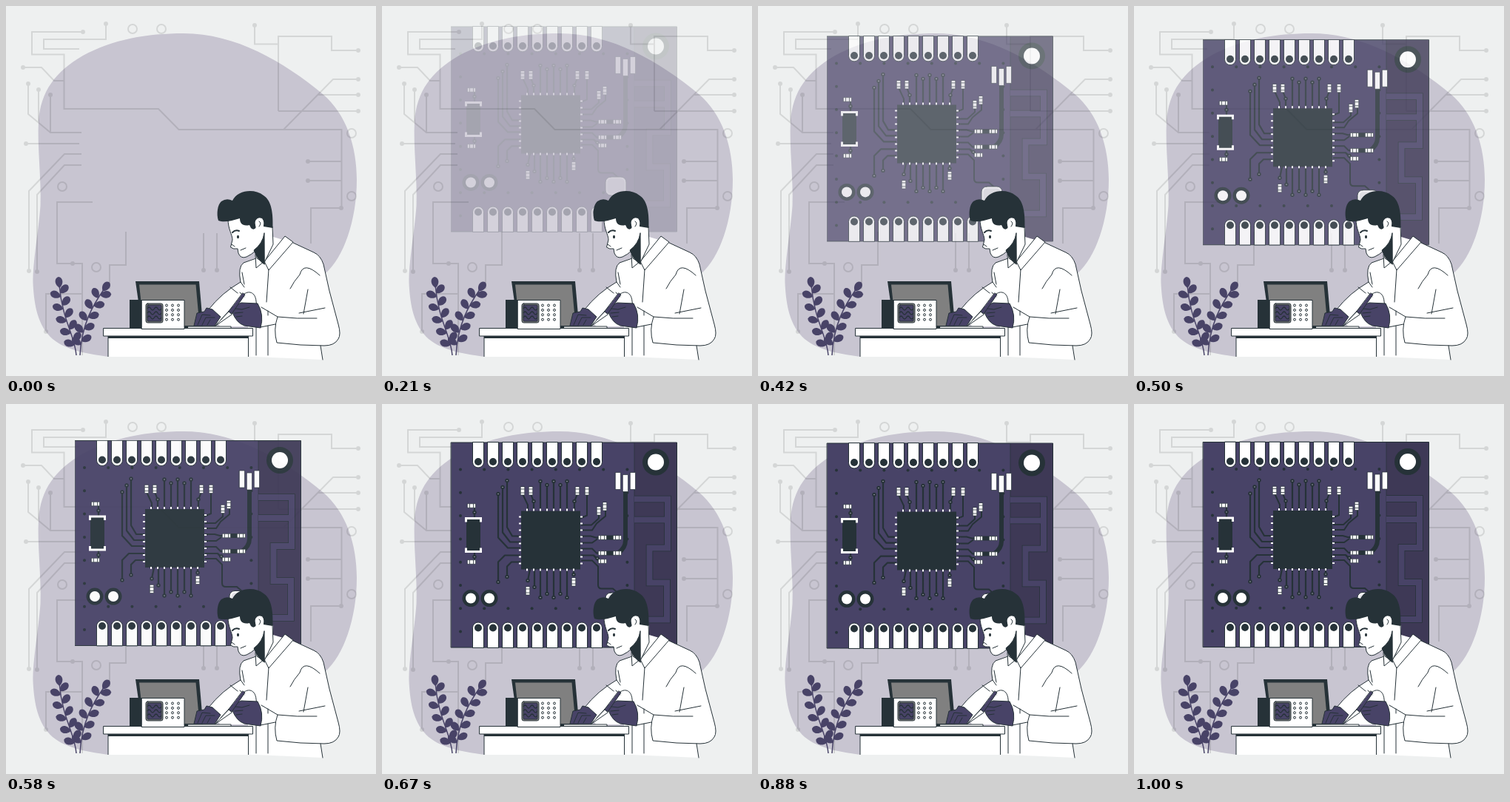
An HTML page for the animation above (1040 ms loop, 500 px wide and 500 px high).

```html
<!DOCTYPE html>
<html lang="en">
<head>
<meta charset="utf-8">
<title>Electronics workshop</title>
<style>
html, body { margin: 0; width: 100%; height: 100%; overflow: hidden; background: #eef0f0 }
svg { display: block; width: 100vw; height: 100vh }
.dark { fill: #263238 }
.plum { fill: #484367 }
.white { fill: #fff }
.line { fill: none; stroke: #263238 }
.ink { stroke: #263238; stroke-linejoin: round; stroke-linecap: round }
.bare { stroke: none }
</style>
</head>
<body>
<svg viewBox="0 0 500 500">
  <path fill="#c8c5d1" d="M240 37C310 37 375 75 428 119C460 146 474 190 474 235C474 290 456 340 432 361L340 474H140C115 471 82 466 63 450C43 432 38 405 36.500 375C36 345 44 305 46.500 270C48 235 42 190 44 155C47 116 66 89 104 67C145 45 190 37 240 37Z"/>

  <!-- every wire in the first path starts at a round node -->
  <g opacity=".1">
    <g fill="none" stroke="#000" stroke-width="2">
      <path id="wires" d="M104 35H35V65.500H78.500V139H206L233.500 167H453.500V273M453 273H412V321M135 24V45H51V58H99M23 83H48L65 101H78M30 105V146L60 171H102M44 113V157M60 120V171M27 186H99M31 358V250L79 200H102M42 359V255L79 215H102M90 348H69V265H117M54 440V389H103M267 357V307M285 357V307M336 26V51.500H368M476 60H440V41H368V142M476 99H442L375 167M476 120H421M476 142H368M408 210H453M408 236H453"/>
      <path d="M90 348H103V472M162 305V350H140V382"/>
      <g id="rings"></g>
    </g>
    <g id="nodes"></g>
  </g>

  <g id="board">
    <path class="plum ink" d="M93.500 51.500H398.500V328.500H93.500Z"/>
    <path fill="#3e3956" d="M341 52H398V328H341Z"/>
    <path class="line" stroke-width=".7" d="M341 52V328"/>
    <g id="antenna" fill="none"></g>
    <g id="grid" class="dark"></g>
    <g id="pads"></g>
    <path id="traces" class="line" stroke-width="2.200" stroke-linejoin="round"/>
    <path class="line" stroke-width="2" d="M190 121L197 136V143M201 121L205 131M264 121L260 131M277 122V150L268 154M293 149V154L283 163H269M302 143V151L290 161L284 170H269M269 178H282L289 180H297M269 187H284L291 182M269 195H284L290 201H297M269 204H286L293 212M269 211H284L292 219V244Q292 249 297 249H312L319 255M125 139V154M125 198V211"/>
    <path class="line" stroke-width="6" d="M329 118V184Q329 194 319 201M297 180H323M297 201H323"/>
    <path class="dark" d="M188 144H268V223H188ZM114 154H133V198H114Z"/>
    <path fill="none" stroke="#fff" stroke-width="3" d="M113.500 159V154H133.500V159M113.500 194V199H133.500V194"/>
    <g id="vias"></g>
    <g id="pins" class="white"></g>
    <g id="parts"></g>
    <rect class="ink" fill="#fff" x="302" y="254.500" width="28" height="25" rx="7"/>
    <rect fill="#e4e4e8" x="304.500" y="257" width="23" height="20" rx="5"/>
    <path class="white ink" stroke-width=".7" d="M315.500 92H322.500V115H315.500ZM325.500 95H332.500V118H325.500ZM335.500 92H342.500V115H335.500Z"/>
  </g>

  <g id="plant" class="plum">
    <path class="stem" fill="none" stroke="#484367" stroke-width="1.500" d="M95 472C93 445 76 425 72 377"/>
    <path class="stem" fill="none" stroke="#484367" stroke-width="1.500" d="M100 472C102 430 118 403 133 382"/>
  </g>

  <!-- screen -->
  <path class="dark" d="M175 372H261L266.500 435H184Z"/>
  <path fill="#808080" d="M180 376.500H256.500L261.500 432H186Z"/>

  <!-- technician -->
  <g class="ink" fill="#fff">
    <path class="bare" d="M341 339L321 347Q313 353 317 373Q291 388 274 410L289 433H327V474H338L428 478L425 458Q444 460 450 450Q452 440 449 430L437 385L429 349Q425 337 416 333L388 320L361 312V299H347V340Z"/>
    <path fill="none" d="M338 341L321 347Q313 353 317 373Q291 388 274 410M290 424L308 405M388 320L416 333Q425 337 429 349L437 385L449 430Q453 444 449 450Q444 459 430 459Q398 459 366 455Q361 437 367 420Q393 423 420 422M425 459L428 478M345 407L367 420M344 434L364 430"/>
    <path d="M337 336L338 354L349 345ZM349 345L355 357L388 319L377 311L350 344Z"/>
    <path d="M300 288C300 302 306 309 306 316L303.500 326Q307 329 313 328L314 334Q317 342 325 339Q332 336 338 330L339 341L349 347L361 322L360 298L345 285L317 283Z"/>
    <path class="dark" d="M349 307Q347 321 335 330Q340 343 349 349Z"/>
    <path class="dark bare" d="M287 290C284 281 286 268 291 264Q298 259 306 263C313 249 335 246 348 256C359 263 361 280 360.500 300L348 298C349 289 344 285 340 287C336 290 336 293 338 299Q335 304 331 300L329 296C320 298 316 294 316 287C306 290 295 293 287 290Z"/>
    <path class="bare" d="M337 292Q340 285 346 287Q350 292 347 299Q344 305 338 302Z"/>
    <g fill="none">
      <path d="M424 364Q402 344 397 363Q389 372 384 382M408 383L402 416M396 415L431 408M355 356L352 400M354 412V418M354 432V472M338 405V472M317 373L322 380M319 360L322 376M303 380L313 388M316 387L322 393"/>
      <path d="M306 306Q310 302 315 304" stroke-width="2"/>
      <path d="M317 330L324 327M305 322L309 325M342 291Q346 293 342 298"/>
      <path d="M321 390C327 384 337 386 338 399L339 408"/>
    </g>
    <ellipse class="dark bare" cx="313.500" cy="312" rx="1.500" ry="2.200"/>
    <path class="plum" d="M254 432L258 415L268 413L271 408L279 410L290 420L282 432Z"/>
    <path fill="none" d="M259 431L265 417L276 418M265 431L270 421L282 421M272 431L276 424"/>
    <path d="M301 413L282 433L305 417Z"/>
    <path class="plum" d="M307 406L318 401L340 402Q349 417 344 435L322 432Q311 428 306 414Z"/>
    <path class="plum" d="M320 388L323 390L305 416L301 413Z"/>
    <path fill="none" d="M310 409L319 410L329 407M309 415L320 414M311 420L319 419"/>
  </g>

  <!-- desk and meter -->
  <path class="white" d="M138 446H327V474H138Z"/>
  <path class="dark" d="M138 446H327V449H138Z"/>
  <path class="line" d="M138 446V474M327.500 446V474"/>
  <path class="white ink" d="M132 435.500H333.500V446H132ZM246 433H304V435.500H246Z"/>
  <path class="dark" d="M167 397H184V436H167Z"/>
  <path class="white ink" d="M183.500 397.500H241V436.500H183.500Z"/>
  <rect class="ink" x="189" y="402" width="23" height="26" rx="2.500" fill="#808080"/>
  <rect class="plum ink" x="191" y="404" width="19" height="22" rx="1"/>
  <g id="meter" class="line"></g>
</svg>
<script>
const get = id => document.getElementById(id);
const add = (id, list, draw) => get(id).insertAdjacentHTML('beforeend', list.map(draw).join(''));
const range = (n, start = 0, step = 1) => Array.from({ length: n }, (_, i) => start + i * step);
const dot = r => ([x, y]) => `<circle cx="${x}" cy="${y}" r="${r}"/>`;
const starts = path => [...path.getAttribute('d').matchAll(/M(\d+) (\d+)/g)].map(m => [m[1], m[2]]);

add('nodes', starts(get('wires')), dot(3));
add('rings', [[171, 31], [210, 31], [76, 244], [122, 353], [467, 172], [467, 257]], dot(6));

// two strokes give the antenna its dark edge
add('antenna', [['#263238', 9.5], ['#484367', 8]], ([color, width]) =>
  `<path stroke="${color}" stroke-width="${width}" d="M341 128H386V194H361.500V241H385V291H350M341 156H386"/>`);

// drill holes along the rim of an 8 by 8 grid
add('grid', range(64).map(i => [i % 8, i >> 3]).filter(([col, row]) => col % 7 == 0 || row == 0 || row == 6),
  ([col, row]) => dot(2)([106 + col * 32.2, 88 + row * 31.3]));

// edge contacts and mounting holes
add('pads', range(9, 122.5, 20), x =>
  `<path class="white ink" d="M${x} 51.500V78a7.500 7.500 0 0 0 15 0V51.500ZM${x} 328.500V302a7.500 7.500 0 0 1 15 0V328.500Z"/>
   <g class="dark">${dot(5)([x + 7.5, 77.5])}${dot(5)([x + 7.5, 302])}</g>`);
add('pads', [[370, 78, 18, 11], [120, 262, 11.5, 7], [145, 262, 11.5, 7]], ([x, y, outer, inner]) =>
  `<g class="dark">${dot(outer)([x, y])}</g><g class="white">${dot(inner)([x, y])}</g>`);

// traces run from a via to the chip
const fan = range(5).map(i => `M${214 + i * 9} ${104 + i % 2 * 5}V143M${214 + i * 9} ${261 - i % 2 * 5}V223`);
const bends = range(3).map(i => `M${157 + i * 6} ${121 - i * 9}V${180 - i * 7}L${170 + i * 3} ${194 - i * 8}H187`);
const hooks = range(2).map(i => `M${157 + i * 12} ${240 - i * 7}V${213 + i * 6}l${9 - i * 3} ${-9 + i * 3}H187`);
get('traces').setAttribute('d', fan.join('') + bends.join('') + hooks.join('') +
  'M205 131V143M260 131V143M197 238L200 223M206 247V223M259 230V223M125 146V152M125 206V200M291 208L286 204');
add('vias', starts(get('traces')),
  p => `<g class="dark">${dot(2.7)(p)}</g><g fill="#a9a7b5">${dot(.8)(p)}</g>`);

add('pins', range(8), i => {
  const x = 195 + i * 9, y = 151 + i * 9;
  return `<path d="M${x} 141h2v3h-2zM${x} 222h2v3h-2zM185 ${y}h3v2h-3zM268 ${y}h3v2h-3z"/>`;
});

// small chip resistors
const part = angle => ([x, y]) => `<g transform="translate(${x} ${y}) rotate(${angle})">
  <path class="white ink" stroke-width=".6" d="M-5.500-2.700H5.500V2.700H-5.500Z"/>
  <path class="line" stroke-width=".8" d="M-2.500-2.700V2.700M2.500-2.700V2.700"/></g>`;
add('parts', [190, 201, 264, 277].map(x => [x, 117]).concat([[293, 144], [301, 138], [197, 252], [259, 240]]), part(90));
add('parts', [180, 201].flatMap(y => [[298, y], [318, y]]).concat([[121, 137], [121, 213], [298, 212]]), part(0));

add('meter', range(3, 409, 6), y => `<path stroke-width="1.300" d="M191 ${y}q2.400-4 4.700 0t4.700 0t4.700 0t4.700 0"/>`);
add('meter', range(12), i => dot(1.5)([217 + i % 3 * 8, 404.5 + Math.floor(i / 3) * 6.4]));

// leaf pairs grow from each stem, with one leaf at its tip
for (const stem of document.querySelectorAll('.stem')) {
  const length = stem.getTotalLength();
  const leaf = (at, turn) => {
    const a = stem.getPointAtLength(at - 1), b = stem.getPointAtLength(at);
    const angle = Math.atan2(b.y - a.y, b.x - a.x) * 180 / Math.PI + 90 + turn;
    return `<path transform="translate(${b.x} ${b.y}) rotate(${angle})" d="M0 0C-7-5-6-14 0-15C6-14 7-5 0 0Z"/>`;
  };
  add('plant', range(5, 14, 17), at => leaf(at, -58) + leaf(at + 5, 52));
  add('plant', [length - 4], at => leaf(at, 0));
}

// cubic-bezier(.36, -.01, .5, 1.38), solved by bisection
const bezier = (a, b, s) => 3 * a * s * (1 - s) ** 2 + 3 * b * s * s * (1 - s) + s ** 3;
function ease(x) {
  let lo = 0, hi = 1;
  for (let i = 0; i < 24; i++) {
    const mid = (lo + hi) / 2;
    if (bezier(.36, .5, mid) < x) lo = mid; else hi = mid;
  }
  return bezier(-.01, 1.38, hi);
}

const LOOP = 1040, FPS = 24, DROP = 30;
const board = get('board');
const start = performance.now();

function render() {
  const time = (performance.now() - start) % LOOP;
  const step = Math.floor(time * FPS / 1000 + .1);
  const p = step ? ease(Math.min(1, (step + .84) / FPS)) : 0;
  board.setAttribute('transform', `translate(0 ${(p - 1) * DROP})`);
  board.setAttribute('opacity', Math.max(0, Math.min(1, p)));
  requestAnimationFrame(render);
}
render();
</script>
</body>
</html>
```
